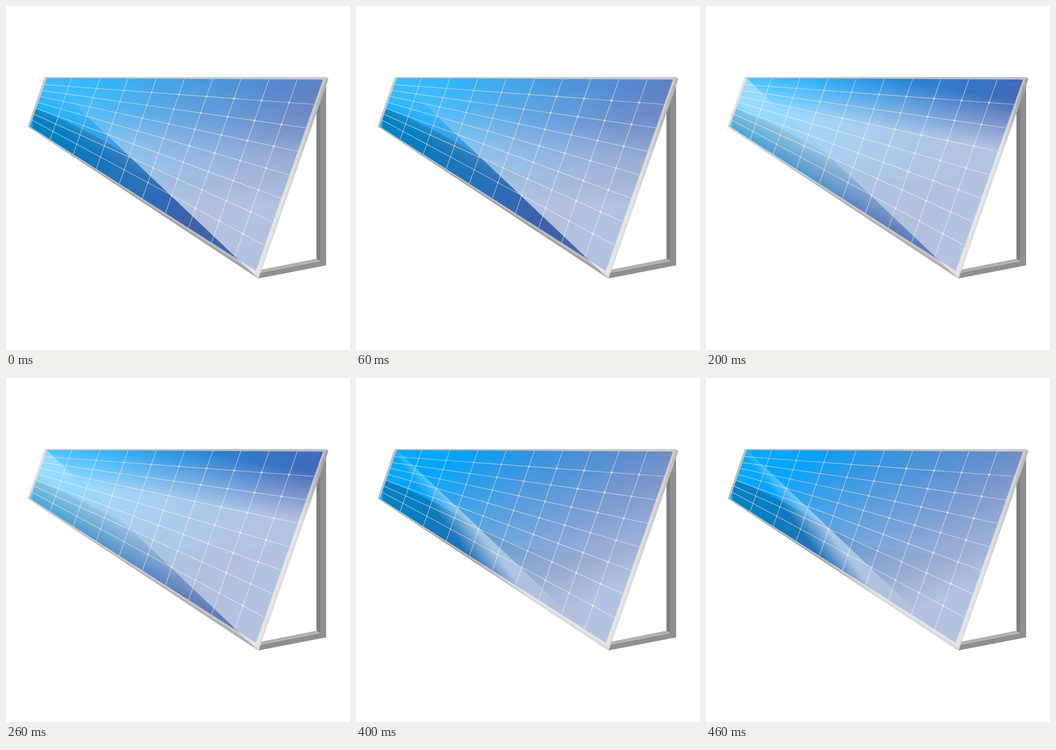
Recreate the animation shown at these times as an HTML page. Size 749 by 748 pixels, loop 0.5 s.

```html
<!DOCTYPE html>
<html lang="en">
<head>
<meta charset="utf-8">
<title>Solar panel</title>
<style>
  html, body { margin: 0; width: 100%; height: 100%; overflow: hidden; background: #fff; }
  svg { display: block; width: 749px; height: 748px; }
  .glare { opacity: 0; animation: show 500ms step-end infinite; }
  @keyframes show {
    0% { opacity: 1; }
    20%, 100% { opacity: 0; }
  }
</style>
</head>
<body>
<svg viewBox="0 0 749 748" xmlns="http://www.w3.org/2000/svg">
  <defs id="defs">
    <linearGradient id="cells" gradientUnits="userSpaceOnUse" x1="120" y1="120" x2="450" y2="450">
      <stop offset=".08" stop-color="#00aaff"/>
      <stop offset=".24" stop-color="#02a3fa"/>
      <stop offset=".35" stop-color="#1397ec"/>
      <stop offset=".56" stop-color="#2885d6"/>
      <stop offset=".77" stop-color="#3475c7"/>
      <stop offset=".97" stop-color="#4469b7"/>
    </linearGradient>
    <linearGradient id="shade" gradientUnits="userSpaceOnUse" x1="60" y1="240" x2="520" y2="540">
      <stop offset="0" stop-opacity=".24"/>
      <stop offset=".25" stop-opacity=".19"/>
      <stop offset=".5" stop-opacity=".1"/>
      <stop offset=".83" stop-opacity=".07"/>
      <stop offset="1" stop-opacity=".01"/>
    </linearGradient>
    <clipPath id="glass"><path d="M89 156.500L690 160 544 576 52 262Z"/></clipPath>
    <clipPath id="body"><path d="M84 154.500H697L702 159 550.500 591 549 592.500 47 262V260Z"/></clipPath>
  </defs>

  <!-- stand -->
  <path fill="#8f8f8f" d="M684 172H697V564L549 592.500 554 580 684 554.500Z"/>
  <path fill="#7b7f7f" d="M676 200H684V555L676 550Z"/>
  <path fill="#afafaf" d="M556 573.200L676 549.500 684 554 553 580Z"/>

  <!-- frame and cells -->
  <path fill="#a2a2a2" d="M47 261L549 584V592.500L47 262Z"/>
  <path fill="#a6a6a6" d="M697 154.500L702 159 550.500 591 549 592.500V585Z"/>
  <path fill="#bebebe" d="M84 154.500H697L549 586 47.500 261Z"/>
  <g clip-path="url(#glass)">
    <path fill="url(#cells)" d="M40 150H710V600H40Z"/>
    <path fill="url(#shade)" d="M60 222C130 246 200 285 270 327C350 374 425 381 480 381C540 380 590 362 625 341L700 620H40Z"/>
  </g>
  <g id="grid" stroke="#c6cacd" fill="#c6cacd" stroke-width="1.200"></g>
  <g id="glares" clip-path="url(#body)"></g>
</svg>
<script>
  const $ = id => document.getElementById(id);
  function add(parent, tag, attrs) {
    const el = document.createElementNS('http://www.w3.org/2000/svg', tag);
    for (const k in attrs) el.setAttribute(k, attrs[k]);
    return parent.appendChild(el);
  }
  const mix = (a, b, t) => a + (b - a) * t;
  const line = (x1, y1, x2, y2) => {
    add($('grid'), 'line', { x1, y1, x2, y2 });
    return [x1, y1, x2, y2];
  };

  // Crossing point of two lines
  function cross([ax, ay, bx, by], [cx, cy, dx, dy]) {
    const ux = bx - ax, uy = by - ay, vx = dx - cx, vy = dy - cy;
    const t = ((cx - ax) * vy - (cy - ay) * vx) / (ux * vy - uy * vx);
    return [ax + ux * t, ay + uy * t];
  }

  const cols = [], rows = [];
  for (let i = 1; i < 10; i++)
    cols.push(line(81.600 + 61.400 * i, mix(156.500, 160, i / 10), 46 + 50.200 * i, 258 + 32.050 * i));
  for (let j = 1; j < 8; j++)
    rows.push(line(88.500 - 4.500 * j, 158 + 12.900 * j, 690 - 18.300 * j, 163 + 51 * j));
  for (const c of cols) for (const r of rows) {
    const [cx, cy] = cross(c, r);
    add($('grid'), 'circle', { cx, cy, r: mix(.8, 2.500, Math.min(1, cx / 480)), stroke: 'none' });
  }

  // White gloss on either side of the diagonal:
  // gradient normal, then pairs of distance along it and opacity
  const band = [-.48, .88], fan = [.75, -.66];
  const looks = [
    { low: [band, 120, .22, 150, .14, 185, 0],
      high: [[-.1, 1], 120, .16, 200, .27, 270, .45, 380, .6] },
    { low: [band, 20, 0, 95, .6, 145, .6, 235, .05],
      high: [band, 10, 0, 95, .6] },
    { low: [band, 60, .35, 100, .58, 150, .58, 240, .14],
      high: [[-.17, .985], 85, 0, 200, .6] },
    { low: [fan, -118, .08, -50, .6],
      high: [[0, 1], 140, .06, 190, .21, 285, .6] },
    { low: [[.8, -.6], -35, 0, 15, .6],
      high: [[.35, .94], 240, 0, 630, .6] }
  ];
  const sides = {
    low: 'M79.500 148L560.600 603.360 40 600V148Z',
    high: 'M79.500 148L560.600 603.360 720 600V148Z'
  };

  function gradient(id, [[nx, ny], ...stops]) {
    const k = nx * nx + ny * ny, from = stops[0], to = stops[stops.length - 2];
    const g = add($('defs'), 'linearGradient', {
      id, gradientUnits: 'userSpaceOnUse',
      x1: nx * from / k, y1: ny * from / k, x2: nx * to / k, y2: ny * to / k
    });
    for (let i = 0; i < stops.length; i += 2)
      add(g, 'stop', {
        offset: (stops[i] - from) / (to - from),
        'stop-color': '#fff', 'stop-opacity': stops[i + 1]
      });
  }

  looks.forEach((look, i) => {
    const g = add($('glares'), 'g', { class: 'glare' });
    g.style.animationDelay = (i ? i * 100 - 500 : 0) + 'ms';
    for (const side in sides) {
      gradient(side + i, look[side]);
      add(g, 'path', { d: sides[side], fill: `url(#${side + i})` });
    }
  });
</script>
</body>
</html>
```
